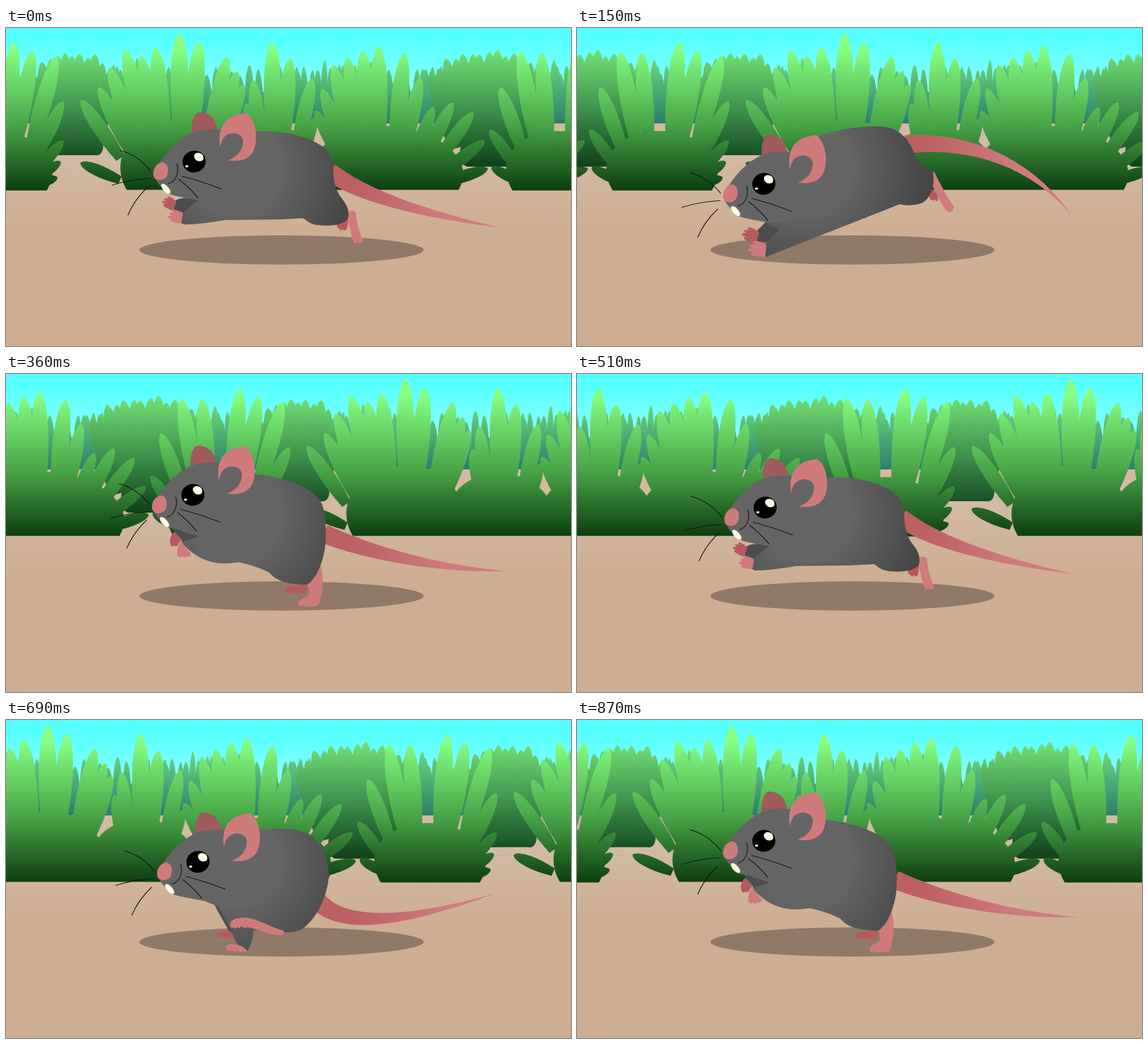
Animation, 889 px wide and 500 px high, one loop 900 ms. Source, as an HTML page:

```html
<!DOCTYPE html>
<html lang="en">
<head>
<meta charset="utf-8">
<title>Running mouse</title>
<style>
html, body { margin: 0; width: 100%; height: 100%; overflow: hidden; }
svg { display: block; width: 100vw; height: 100vh; }
.whisk { fill: none; stroke: #111; stroke-width: 1.2; stroke-linecap: round; }
.pink { fill: #cf7b7c; }
.rose { fill: #b55a5c; }
.dark { fill: #4c4c4d; }
.fur { fill: url(#fur); }
.tail { fill: url(#tail); }
</style>
</head>
<body>
<svg viewBox="0 0 889 500" preserveAspectRatio="none">
  <defs>
    <linearGradient id="sky" x2="0" y2="1"><stop offset=".1" stop-color="#55ffff"/><stop offset="1" stop-color="#b4ffff"/></linearGradient>
    <linearGradient id="soil" gradientUnits="userSpaceOnUse" x1="0" x2="0" y1="150" y2="320"><stop offset=".3" stop-color="#d2baa3"/><stop offset="1" stop-color="#ceae92"/></linearGradient>
    <linearGradient id="back" gradientUnits="userSpaceOnUse" x1="0" x2="0" y1="38" y2="150"><stop stop-color="#72e37d"/><stop offset="1" stop-color="#2c7d6c"/></linearGradient>
    <linearGradient id="mid" gradientUnits="userSpaceOnUse" x1="0" x2="0" y1="33" y2="212"><stop stop-color="#74e276"/><stop offset=".55" stop-color="#3d8d4b"/><stop offset="1" stop-color="#12451c"/></linearGradient>
    <linearGradient id="front" gradientUnits="userSpaceOnUse" x1="0" x2="0" y1="8" y2="254"><stop offset=".1" stop-color="#86ff83"/><stop offset=".58" stop-color="#4aa548"/><stop offset="1" stop-color="#0d3f10"/></linearGradient>
    <linearGradient id="tail" gradientUnits="userSpaceOnUse" x1="510" x2="690" y1="0" y2="0"><stop offset=".2" stop-color="#bc6062"/><stop offset="1" stop-color="#cf7b7d"/></linearGradient>
    <radialGradient id="fur" gradientUnits="userSpaceOnUse" cx="360" cy="220" r="185"><stop offset=".38" stop-color="#656565"/><stop offset="1" stop-color="#464647"/></radialGradient>
    <g id="grass"></g>
  </defs>
  <rect width="889" height="160" fill="url(#sky)"/>
  <rect y="150" width="889" height="350" fill="url(#soil)"/>
  <g id="scroll">
    <use href="#grass"/><use href="#grass" x="-889"/><use href="#grass" x="-1778"/>
  </g>
  <ellipse cx="433.5" cy="349" rx="223.5" ry="23" fill="#907966"/>

  <g id="behind"></g>
  <g id="headBack">
    <path fill="#a05a5b" d="M293 172C290 148 296 132 306 132.500C321 134 331 142 333 165Z"/>
  </g>
  <g id="body"></g>
  <g id="head">
    <path fill="#656565" d="M233 234C234 215 262 180 290 166C305 160 320 158 340 160L380 163L392 215C380 250 345 275 303 271C290 268 270 266 257 261C247 254 240 246 233 234Z"/>
    <path class="pink" d="M337 188C333 160 340 137 378 133.500C392 142 398 172 390 192C383 207 367 211 349 208C362 204 374 193 373 176C370 164 352 162 343 172C339 177 338 182 337 188Z"/>
    <ellipse cx="296" cy="210" rx="18.300" ry="17.200" transform="rotate(-12 296 210)"/>
    <path fill="#fffbe6" d="M296 201C297 195 305 195 309 199C312 203 311 209 307 209C302 211 296 207 296 201Z"/>
    <ellipse cx="284.500" cy="217.500" rx="2.600" ry="1.700" fill="#fffbe6"/>
    <path class="pink" d="M232 232C230 222 238 211 246 211C255 212 257 224 253 233C248 241 234 241 232 232Z"/>
    <path d="M269 213C273 228 267 242 255 245" fill="none" stroke="#2b2b2b" stroke-width="1.700"/>
    <ellipse cx="251.500" cy="252.800" rx="4.300" ry="9.800" transform="rotate(-42 251.500 252.800)" fill="#fffbe6"/>
    <path class="whisk" d="M228 225Q208 200 180 192.500M227 236.500Q195 238 167 247M223 250Q202 270 192 294M277 233Q305 240 339 253M272 238Q288 250 302 267"/>
  </g>
  <g id="over"></g>
</svg>
<script>
const W = 889, LOOP = 900, STEP = 30;
const $ = id => document.getElementById(id);
const shape = (cls, d) => `<path class="${cls}" d="${d}"/>`;

let seed = 11;
const rnd = () => (seed = seed * 16807 % 2147483647) / 2147483647;

// One leaf from its base (bx, by), widest in the middle, pointed at the tip.
function blade(tx, ty, bx, by, w) {
  const dx = tx - bx, dy = ty - by, len = Math.hypot(dx, dy);
  const nx = -dy / len * w, ny = dx / len * w;
  const at = (k, s) => (bx + dx * k + nx * s).toFixed(1) + ' ' + (by + dy * k + ny * s).toFixed(1);
  return shape('', `M${at(0, .35)}C${at(.5, .7)} ${at(.95, .5)} ${at(1, 0)}C${at(.95, -.5)} ${at(.5, -.7)} ${at(0, -.35)}Z`);
}

// A domed bush between l and r whose leaves lean away from its centre.
function bush(l, cx, r, top, base, tips) {
  const dome = `M${l} ${base}C${l - 30} 205 ${l + 10} ${top} ${cx} ${top}S${r + 30} 205 ${r} ${base}Z`;
  return shape('', dome) + tips.map(([x, y]) => {
    const bx = cx + (x - cx) * .6, by = y * .35 + 165;
    return blade(x, y, bx, by, 11 + .1 * Math.hypot(x - bx, y - by));
  }).join('');
}

// Random tips from x0 to x1, lower towards both ends.
function spread(x0, x1, gap, high) {
  const tips = [];
  for (let x = x0; x <= x1; x += gap) {
    const side = Math.abs(2 * (x - x0) / (x1 - x0) - 1);
    tips.push([x + rnd() * 4 - 2, high + rnd() * 12 + 32 * side ** 3]);
  }
  return tips;
}

function backRow() {
  let out = '<path d="M0 100H890V150H0Z"/>';
  for (let x = 4; x < W; x += 9) {
    const dip = 6 * Math.sin(x / 47);
    out += blade(x + rnd() * 10 - 5, 52 + dip + rnd() * 22, x, 148, 9 + rnd() * 4);
  }
  return out;
}

const midRow =
  bush(55, 105, 140, 118, 200, spread(45, 172, 12, 36)) +
  bush(725, 765, 800, 120, 218, spread(668, 850, 13, 34));

const frontRow =
  bush(797, 870, 953, 162, 255.5, [
    [761, 160], [764, 219], [777, 93], [809, 38], [842, 39], [902, 22], [931, 36],
    [969, 44], [979, 115], [979, 177], [975, 210], [970, 235]]) +
  bush(190, 273, 350, 144, 254.5, [
    [118, 113], [117, 212], [146, 93], [168, 94], [163, 62], [187, 34], [213, 44],
    [235, 30], [273, 8], [304, 21], [348, 45], [364, 68], [374, 88]]) +
  bush(350, 420, 495, 156, 254.5, [[378, 118], [389, 82], [419, 22], [447, 48], [482, 79], [487, 140]]) +
  bush(495, 590, 712, 154, 254.5, [
    [487, 130], [497, 95], [515, 58], [537, 46], [561, 35], [586, 28], [627, 40],
    [652, 78], [673, 124], [703, 117], [735, 132], [753, 177], [758, 221]]);

$('grass').innerHTML = Object.entries({ back: backRow(), mid: midRow, front: frontRow })
  .map(([id, s]) => `<g fill="url(#${id})">${s}</g>`).join('');

// Tapered tail along a cubic curve.
function tail(a, b, c, d) {
  const up = [], down = [], n = 16;
  for (let i = 0; i <= n; i++) {
    const k = i / n, m = 1 - k, half = 14.5 * (1 - k ** 1.3);
    const [x, y] = [0, 1].map(j => m ** 3 * a[j] + 3 * m * m * k * b[j] + 3 * m * k * k * c[j] + k ** 3 * d[j]);
    const [u, v] = [0, 1].map(j => m * m * (b[j] - a[j]) + 2 * m * k * (c[j] - b[j]) + k * k * (d[j] - c[j]));
    const s = half / Math.hypot(u, v);
    up.push([x + v * s, y - u * s]);
    down.unshift([x - v * s, y + u * s]);
  }
  return shape('tail', 'M' + up.concat(down).map(p => p.map(q => q.toFixed(1)).join(' ')).join('L') + 'Z');
}

// Front paw with its wrist at (x, y) and its toes to the left.
const paw = (cls, x, y, turn, size) => `<g transform="translate(${x} ${y}) rotate(${turn}) scale(${size})">` +
  shape(cls, 'M0-10C-8-15-18-16-22-13Q-22-10-18-9Q-27-9-26-5Q-25-3-20-3Q-29-2-28 2Q-26 4-20 3Q-25 6-22 8C-14 10-6 10 0 9Z') + '</g>';

// Each pose: head offset, parts behind the body, body outline, parts in front.
const poses = [
  { head: [0, 0],
    behind: tail([509, 226], [560, 264], [660, 293], [778, 314]) +
      shape('rose', 'M520 304L538 300Q538 318 534 318Q531 319 530 316Q526 321 525 316Q520 315 520 304Z') +
      shape('dark', 'M300 268C285 267 270 266 264 274V287L282 291L304 274Z') +
      paw('rose', 265, 281, 25, .75) +
      shape('pink', 'M540 288C546 286 552 289 551 294C552 310 558 324 562 336Q562 339 558 337Q556 341 553 337Q549 341 547 336C543 327 541 314 538 304Z'),
    body: 'M330 165L390 163C440 160 480 172 500 188C514 200 515 215 515 225C516 245 520 258 530 270C538 281 541 290 538 300C530 312 500 312 485 309C475 306 472 301 467 299L430 301L345 302C320 306 300 309 280 309C272 306 272 297 277 291C285 284 294 278 303 270L290 240Z',
    over: paw('pink', 277, 300, 10, .8) },
  { head: [-2, 35],
    behind: tail([517, 183], [600, 175], [705, 200], [777, 293]) +
      shape('pink', 'M535 208L545 222L535 224ZM555 224L562 226C570 242 580 262 593 281Q596 284 591 284Q592 291 588 288Q587 293 583 288C576 283 566 264 556 240Z') +
      shape('rose', 'M556 254C563 254 568 260 568 271Q566 274 563 269Q562 274 559 270Q554 272 554 262Z') +
      shape('dark', 'M300 302L278 324L285 338L304 336L322 314Z') +
      paw('rose', 284, 331, 18, .9),
    body: 'M330 197L384 168C430 155 460 154 480 155C505 157 520 172 530 195C535 210 546 220 560 224C564 250 556 268 543 275C530 280 515 279 508 277L297 360Q292 350 296 341L318 316C310 314 300 307 292 303L300 240Z',
    over: paw('pink', 297, 351, 6, 1) },
  { head: [6, 13],
    behind: tail([491, 285], [530, 328], [630, 318], [769, 273]) +
      shape('dark', 'M328 291L352 334H372L360 300Z') +
      shape('rose', 'M354 333C345 331 332 332 332 338Q331 342 340 342L358 343Z'),
    body: 'M330 178L395 173C430 170 450 170 465 175C495 185 507 215 508 240C508 270 492 310 467 328C455 335 440 334 432 333L390 330Q388 350 380 363C368 360 362 350 357 338C350 322 342 308 334 294C322 288 312 284 300 281L310 235Z',
    over: shape('pink', 'M379 362C371 353 354 350 347 354Q344 358 348 360Q346 364 354 363Q367 365 379 364Z') +
      shape('pink', 'M353 323C352 316 358 311 372 311C392 309 412 325 436 331Q440 337 434 338C414 340 398 328 380 326Q374 328 370 324Q368 330 364 325Q361 331 359 326Q354 329 353 323Z') },
  { head: [-2, -20],
    behind: tail([500, 251], [570, 281], [680, 307], [788, 310]) +
      shape('rose', 'M473 330C460 333 440 332 439 340Q439 346 447 344L470 345Z') +
      shape('pink', 'M495 302C502 328 497 348 492 363Q488 366 480 365Q470 367 468 364Q460 367 460 361C460 354 470 352 475 349Q479 339 473 328Z') +
      shape('rose', 'M265 248C258 254 257 262 259 269Q262 273 265 270Q270 273 272 266L278 259Z'),
    body: 'M330 143L386 156C430 162 475 172 495 200C503 215 504 240 503 262C502 285 492 320 474 331C445 331 425 326 414 312C395 303 375 297 365 296C335 301 305 297 277 266L275 248L300 210Z',
    over: shape('dark', 'M262 243C276 248 290 252 304 255Q290 260 279 263L266 249Z') +
      shape('pink', 'M276 262C271 268 268 280 270 286Q273 290 277 287Q281 291 284 287Q290 289 291 282Q283 275 276 262Z') }
];

let lastTick, lastPose;
function draw(now) {
  const tick = Math.floor(now % LOOP / STEP);
  if (tick === lastTick) return;
  lastTick = tick;
  $('scroll').setAttribute('transform', `translate(${W * tick * STEP / LOOP})`);
  const pose = poses[Math.floor(tick % 15 / 4)];
  if (pose === lastPose) return;
  lastPose = pose;
  $('behind').innerHTML = pose.behind;
  $('body').innerHTML = shape('fur', pose.body);
  $('over').innerHTML = pose.over;
  for (const id of ['head', 'headBack']) $(id).setAttribute('transform', `translate(${pose.head})`);
}

const start = performance.now();
function loop() {
  draw(performance.now() - start);
  requestAnimationFrame(loop);
}
loop();
</script>
</body>
</html>
```
